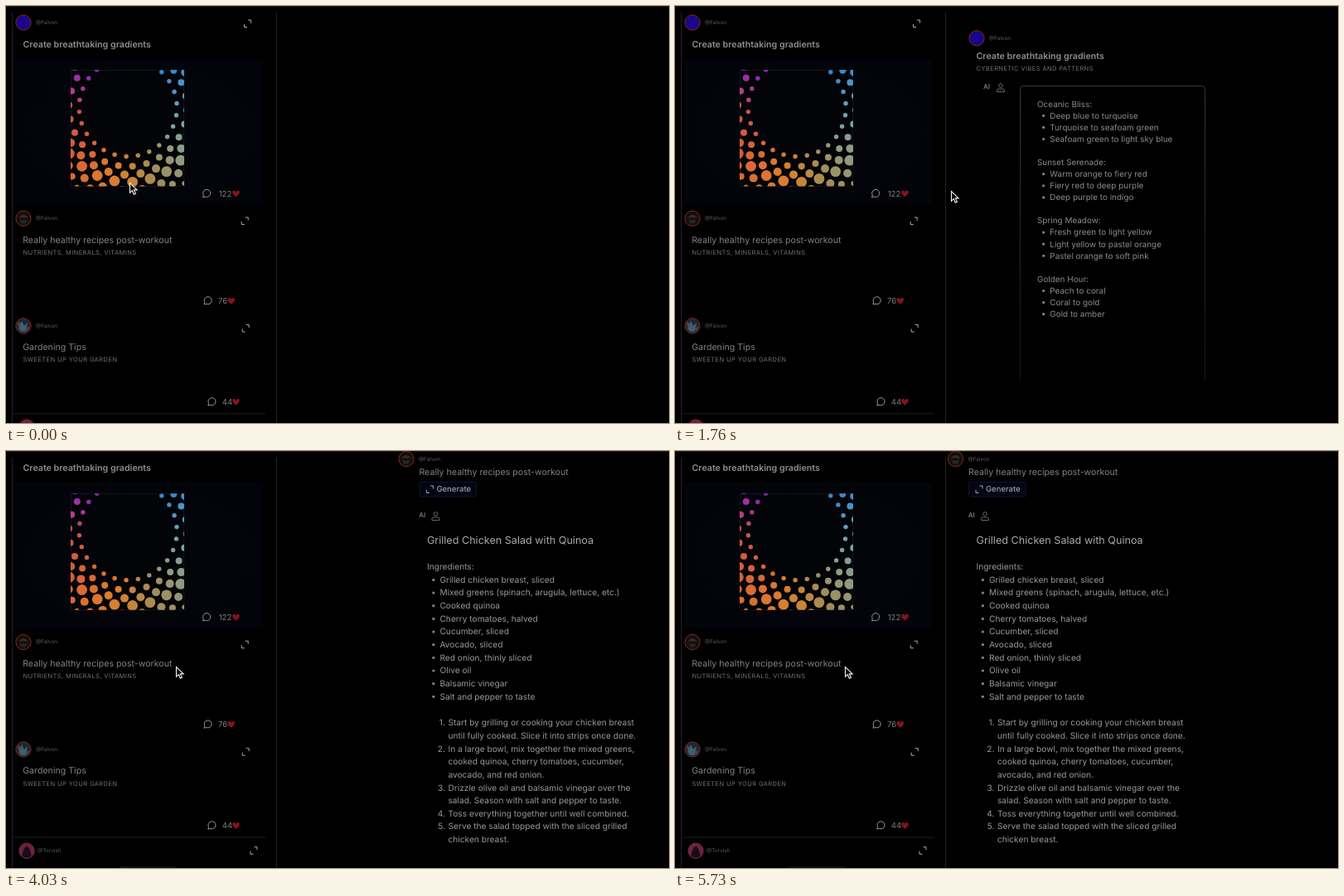
Write an HTML page that moves like this. It is 800 px wide and 503 px high and loops after 5.79 s.

```html
<!DOCTYPE html>
<html lang="en">
<head>
<meta charset="utf-8">
<title>Feed</title>
<style>
  html, body { margin: 0; height: 100%; overflow: hidden; background: #000; }
  svg { display: block; width: 800px; height: 503px; font-family: Inter, sans-serif; text-rendering: geometricPrecision; }
  .title { font-size: 10.7px; font-weight: 600; fill: #8e8e8e; }
  .name { font-size: 10.64px; fill: #828282; }
  .sub { font-size: 7.53px; letter-spacing: .4px; fill: #707070; }
  .tag { font-size: 6.4px; fill: #5c5c62; }
  .count { font-size: 9.6px; fill: #7c7c7c; }
  .ai { font-size: 8px; font-weight: 600; fill: #777; }
  .list { font-size: 9.93px; fill: #8a8a8a; }
  .recipe { font-size: 10.18px; fill: #98989c; }
  .head { font-size: 12.6px; fill: #a8a8ac; }
  .button { font-size: 9.5px; font-weight: 500; fill: #a0a0a6; }
  .line { fill: none; stroke: #8a8a8a; stroke-width: 1; }
</style>
</head>
<body>
<svg viewBox="0 0 800 503">
  <defs>
    <clipPath id="feedClip"><rect y="8" width="326" height="495"/></clipPath>
    <clipPath id="artClip"><rect x="78" y="77" width="137" height="140.5"/></clipPath>
    <clipPath id="round"><circle r="8.7"/></clipPath>
    <linearGradient id="fade" x2="0" y2="452" gradientUnits="userSpaceOnUse">
      <stop offset=".21" stop-color="#393939"/><stop offset="1" stop-color="#151515"/>
    </linearGradient>
    <radialGradient id="night">
      <stop offset="0" stop-color="#05060b"/><stop offset="1" stop-color="#030409"/>
    </radialGradient>
  </defs>
  <path d="M0 .5H800" stroke="#1b1b1b"/>
  <path d="M7.5 8V503M326.5 8V503" stroke="#232323"/>
  <g clip-path="url(#feedClip)"><g id="feed"></g></g>
  <g id="gradients"></g>
  <g id="recipe"></g>
  <g id="cursor">
    <path id="arrow" d="M.5 .5V12.2L3.3 9.7L5.3 14.2L7.4 13.3L5.4 8.9H9.2Z"
      fill="#0a0a0a" stroke="#f2f2f2" stroke-width="1.1"/>
    <path id="hand" d="M-2.5 .6Q-2-.9-.6 0L2 3.2Q3.4 2.4 4.2 3.6Q5.6 3 6.2 4.4Q7.8 4.2 8 6V9L7 11.5H1.4L-2.4 8.4Q-2.8 6.8-1 7L.4 7.4Z"
      fill="#f2f2f2" stroke="#222" stroke-width=".6"/>
  </g>
</svg>
<script>
const LOOP = 5790;
const $ = id => document.getElementById(id);

const text = (cls, x, y, s, extra = '') => `<text class="${cls}" x="${x}" y="${y}" ${extra}>${s}</text>`;
const at = (x, y, body) => `<g transform="translate(${x} ${y})">${body}</g>`;
const disc = (x, y, r, fill) => `<circle cx="${x}" cy="${y}" r="${r}" fill="${fill}"/>`;

// Avatar pictures, drawn around their centre
const blue = disc(0, 0, 9, '#18068c');
const bowl = disc(0, 0, 9, '#130f0e') + '<path d="M-6-1Q0-8 6-1Z" fill="#3c2a25"/><path d="M-5 2H5L2 6H-3Z" fill="#232725"/>';
const plant = disc(0, 0, 9, '#1a2833') + '<path d="M-6 3L-2-6L1 0L5-4L3 7H-3Z" fill="#3b5f74"/><path d="M-7-5L-2-2L-6 1ZM3 3L7 1L5 7Z" fill="#6a4334"/>';
const hood = disc(0, 0, 9, '#702047') + '<path d="M-6 9Q-5 1-3-3Q0-8 3-3Q5 1 6 9Z" fill="#170d18"/>';
const avatar = (x, y, art, tag, ring = '#8c2b1c', gap = 15) => at(x, y,
  `<g clip-path="url(#round)">${art}</g><circle r="9.1" fill="none" stroke="${ring}"/>` + text('tag', gap, 2, tag));

const expand = (x, y) => at(x, y, '<path class="line" style="stroke:#aaa" d="M5 .5H8.5V4M.5 5.5V9H4"/>');
const person = (x, y) => at(x, y, '<path class="line" style="stroke:#666" d="M-2.3-2.5a2.3 2.3 0 1 0 4.6 0a2.3 2.3 0 1 0-4.6 0M-4.5 5V3.5Q-4.5 1.5-2.5 1.5H2.5Q4.5 1.5 4.5 3.5V5Z"/>');
const stats = (x, y, gap, n, heart) =>
  at(x, y, '<path class="line" style="stroke:#999" d="M-4.5 4.7L-3.7 2.2A4.5 4.5 0 1 1-1.7 4Z"/>') +
  text('count', x + gap, y + 3.8, n) +
  at(heart, y, '<path fill="#84131b" d="M0 4.3C-6 .4-4.8-3.4-2.4-3.4Q-.8-3.4 0-1.8Q.8-3.4 2.4-3.4C4.8-3.4 6 .4 0 4.3Z"/>');

// Dot colour by angle around the ring
const hues = [[-45, 52, 132, 208], [0, 98, 166, 188], [42, 143, 156, 130], [66, 160, 141, 92],
  [90, 205, 132, 52], [108, 222, 122, 44], [140, 216, 96, 58], [175, 204, 84, 78], [198, 180, 58, 140], [216, 150, 40, 178], [235, 130, 40, 195]];
function dotColor(angle) {
  const i = Math.max(1, hues.findIndex(h => h[0] >= angle));
  const [a, b] = [hues[i - 1], hues[i]];
  const k = Math.max(0, (angle - a[0]) / (b[0] - a[0]));
  return `rgb(${[1, 2, 3].map(c => Math.round(a[c] + (b[c] - a[c]) * k))})`;
}

// Seven staggered rings of 26 dots
function dots() {
  const radii = [59, 71, 81, 90, 100, 107, 114], sizes = [2.7, 4, 5, 6.4, 5, 4, 2.8];
  let out = '';
  radii.forEach((r, ring) => {
    for (let i = -10; i <= 10; i++) {
      const deg = 92 + ring * .5 + (i - ring % 2 / 2) * 360 / 26, a = deg * Math.PI / 180;
      out += disc((147.2 + r * Math.cos(a)).toFixed(1), (122.5 + r * Math.sin(a)).toFixed(1), sizes[ring], dotColor(deg));
    }
  });
  return out;
}

$('feed').innerHTML =
  avatar(21, 20, blue, '@Falvon') + expand(287, 16.5) +
  text('title', 20.5, 50.2, 'Create breathtaking gradients') +
  '<rect x="12" y="64" width="298" height="176" fill="url(#night)"/>' +
  '<rect x="78.5" y="77.5" width="136" height="140" fill="#030408" stroke="#20242a" stroke-dasharray="1 1"/>' +
  `<g clip-path="url(#artClip)">${dots()}</g>` +
  stats(242, 226, 14.7, 122, 277.5) +
  avatar(21, 256.3, bowl, '@Falvon') + expand(283.7, 254.5) +
  text('name', 20.2, 286.2, 'Really healthy recipes post-workout') +
  text('sub', 20.5, 300.3, 'NUTRIENTS, MINERALS, VITAMINS') +
  stats(243.5, 355.3, 12.5, 76, 271.8) +
  avatar(21, 385.8, plant, '@Falvon') + expand(284.7, 384) +
  text('name', 20.2, 415.3, 'Gardening Tips') +
  text('sub', 20.5, 429.4, 'SWEETEN UP YOUR GARDEN') +
  stats(248.3, 477.2, 12.5, 44, 277.5) +
  '<path d="M8 491.8H313" stroke="#1f1f1f"/>' +
  avatar(25, 508, hood, '@Torvish', '#8e3040', 13) + expand(294.5, 503) +
  '<path d="M137 528H205" stroke="#242424"/>';

const palettes = {
  'Oceanic Bliss': ['Deep blue to turquoise', 'Turquoise to seafoam green', 'Seafoam green to light sky blue'],
  'Sunset Serenade': ['Warm orange to fiery red', 'Fiery red to deep purple', 'Deep purple to indigo'],
  'Spring Meadow': ['Fresh green to light yellow', 'Light yellow to pastel orange', 'Pastel orange to soft pink'],
  'Golden Hour': ['Peach to coral', 'Coral to gold', 'Gold to amber'],
};
const bullet = (cls, x, y, s) => disc(x - 7.6, y - 3.3, 1.6, '#858585') + text(cls, x, y, s);

$('gradients').innerHTML =
  avatar(364, 38.8, blue, '@Falvon') +
  text('title', 363.5, 64.2, 'Create breathtaking gradients') +
  text('sub', 363.5, 78.4, 'CYBERNETIC VIBES AND PATTERNS') +
  text('ai', 372, 99.7, 'AI') + person(393, 98.5) +
  '<path d="M416.5 452V100.5Q416.5 96.5 420.5 96.5H635.5Q639.5 96.5 639.5 100.5V452" fill="none" stroke="url(#fade)"/>' +
  Object.entries(palettes).map(([name, rows], i) => {
    const y = 121.5 + i * 70.4;
    return text('list', 437, y, name + ':') +
      rows.map((s, j) => bullet('list', 452.3, y + 14.1 * (j + 1), s)).join('');
  }).join('');

const ingredients = ['Grilled chicken breast, sliced', 'Mixed greens (spinach, arugula, lettuce, etc.)', 'Cooked quinoa',
  'Cherry tomatoes, halved', 'Cucumber, sliced', 'Avocado, sliced', 'Red onion, thinly sliced', 'Olive oil',
  'Balsamic vinegar', 'Salt and pepper to taste'];
const steps = [
  ['Start by grilling or cooking your chicken breast', 'until fully cooked. Slice it into strips once done.'],
  ['In a large bowl, mix together the mixed greens,', 'cooked quinoa, cherry tomatoes, cucumber,', 'avocado, and red onion.'],
  ['Drizzle olive oil and balsamic vinegar over the', 'salad. Season with salt and pepper to taste.'],
  ['Toss everything together until well combined.'],
  ['Serve the salad topped with the sliced grilled', 'chicken breast.'],
];
const PITCH = 15.66;
let stepY = 331.2 - PITCH;

$('recipe').innerHTML =
  avatar(338.5, 9.6, bowl, '@Falvon') +
  text('name', 354, 28.6, 'Really healthy recipes post-workout') +
  '<rect x="354.5" y="37.5" width="68.5" height="17.5" rx="2" fill="#040413" stroke="#121232"/>' +
  expand(362.5, 41.5) + text('button', 375, 49.4, 'Generate') +
  text('ai', 353.8, 79.7, 'AI') + person(374, 78.5) +
  text('head', 363.5, 111.6, 'Grilled Chicken Salad with Quinoa') +
  text('recipe', 363.5, 143.2, 'Ingredients:') +
  ingredients.map((s, i) => bullet('recipe', 379, 158.7 + i * PITCH, s)).join('') +
  steps.map((rows, i) => rows.map((s, j) => {
    stepY += PITCH;
    return (j ? '' : text('recipe', 385.5, stepY, i + 1 + '.', 'text-anchor="end"')) + text('recipe', 389, stepY, s);
  }).join('')).join('');

const clamp = k => Math.min(1, Math.max(0, k));
const easeOut = k => 1 - (1 - k) ** 3;
const easeInOut = k => k < .5 ? 4 * k ** 3 : 1 - 4 * (1 - k) ** 3;
const smooth = k => k * k * (3 - 2 * k);

// Each move is [start, end, to, ease]; later moves begin where earlier ones stop
function follow(t, from, moves) {
  return moves.reduce((v, [a, b, to, ease = smooth]) => v + (to - v) * ease(clamp((t - a) / (b - a))), from);
}

const gradientMoves = [[560, 1180, -14, easeOut], [1180, 1760, 0], [1790, 2480, 470, easeInOut]];
const recipeMoves = [[3805, 4510, -8, easeOut], [4510, 5060, 0]];
const cursorX = [[30, 390, 143], [1210, 1760, 333], [1820, 2560, 265], [2850, 3340, 205]];
const cursorY = [[30, 390, 205], [1210, 1760, 223], [1820, 2560, 231], [2850, 3340, 260]];

const move = (id, x, y) => $(id).setAttribute('transform', `translate(${x.toFixed(2)} ${y.toFixed(2)})`);
const show = (id, on) => $(id).style.display = on ? '' : 'none';

function draw(now) {
  const t = now % LOOP;
  const scroll = t < 2755 ? 0 : follow(t, 18.8, [[2765, 3100, 25.8, easeOut]]);
  move('feed', 0, -scroll);
  move('gradients', follow(t, 470, gradientMoves), 0);
  move('recipe', follow(t, 475, recipeMoves), 0);
  move('cursor', follow(t, 149, cursorX), follow(t, 213, cursorY));
  const pointing = t > 2400 && t < 2950;
  show('hand', pointing);
  show('arrow', !pointing);
}

let start;
function tick(now) {
  start ??= now;
  draw(now - start);
  requestAnimationFrame(tick);
}
draw(0);
requestAnimationFrame(tick);
</script>
</body>
</html>
```
